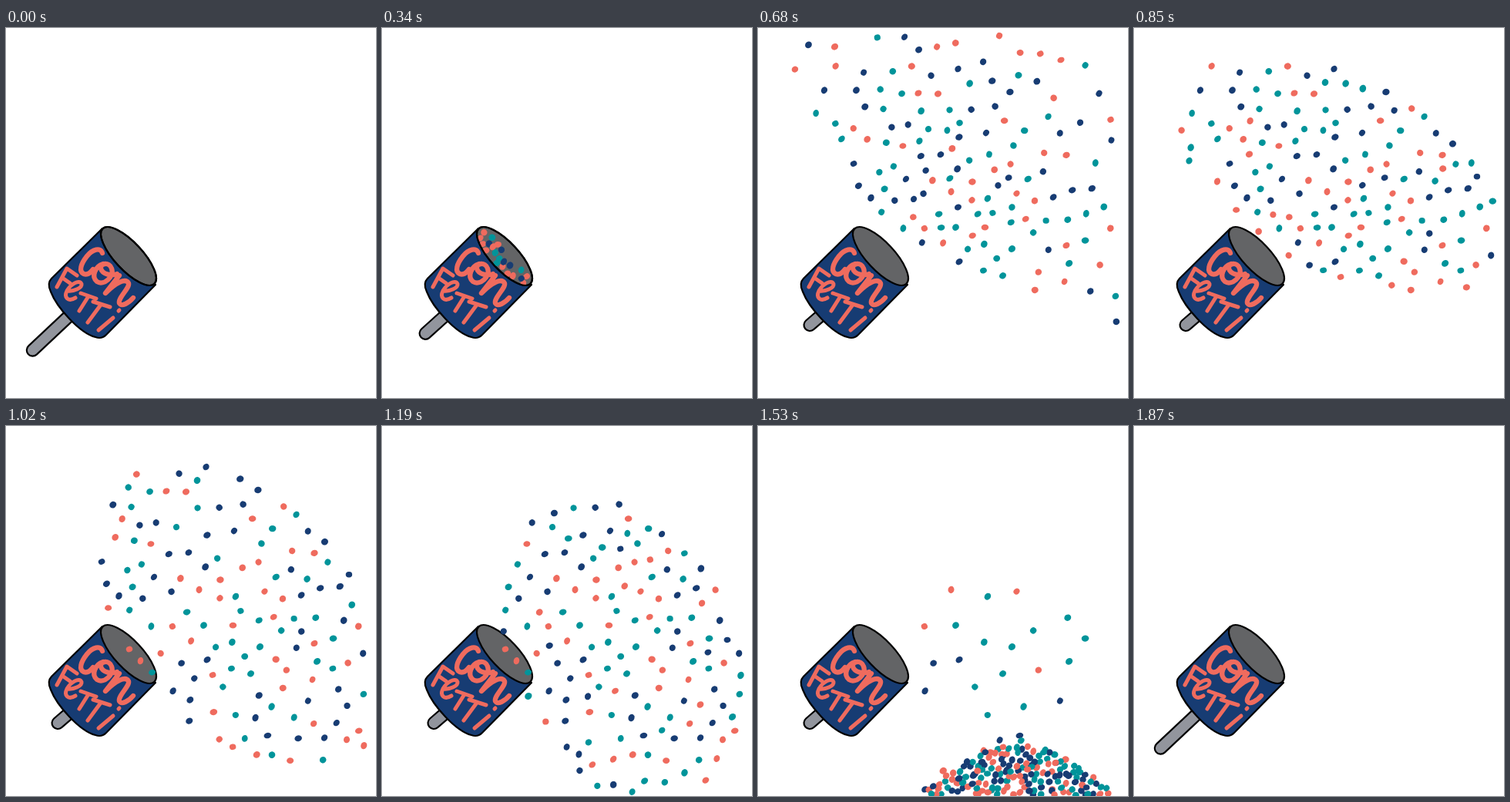
Write an HTML page with a canvas that moves like this. It is 480 px wide and 480 px high and loops after 2.04 s.

```html
<!DOCTYPE html>
<html lang="en">
<head>
<meta charset="utf-8">
<title>Confetti popper</title>
<style>
html, body { margin: 0; height: 100%; overflow: hidden; background: #fff; }
canvas { display: block; width: 100%; height: 100%; }
</style>
</head>
<body>
<canvas id="stage" width="480" height="480" role="img" aria-label="Confetti"></canvas>
<script>
const STEP = 170, STEPS = 12, RAD = Math.PI / 180;
const RED = '#ef6b5e', TEAL = '#00949a', NAVY = '#173c73';
const COLORS = [RED, TEAL, NAVY];
const ctx = document.getElementById('stage').getContext('2d');

function random(seed) {
  return () => {
    seed = seed + 0x6D2B79F5 | 0;
    let t = Math.imul(seed ^ seed >>> 15, 1 | seed);
    t = t + Math.imul(t ^ t >>> 7, 61 | t) ^ t;
    return ((t ^ t >>> 14) >>> 0) / 4294967296;
  };
}
const rnd = random(11);

const dot = (x, y) => ({
  x, y,
  color: COLORS[Math.floor(rnd() * 3)],
  rx: 4.1 + rnd() * .8,
  ry: 3.7 + rnd() * .6,
  turn: -rnd() * 1.4
});

// Regions are tests that tell whether a point lies inside.
function oval(cx, cy, a, b, tilt) {
  const c = Math.cos(tilt * RAD), s = Math.sin(tilt * RAD);
  return (x, y) => {
    const dx = x - cx, dy = y - cy;
    return Math.hypot((dx * c + dy * s) / a, (dy * c - dx * s) / b) < 1;
  };
}

function fan(cx, cy, radius, aim, spread) {
  return (x, y) => {
    const dx = x - cx, dy = y - cy;
    return Math.hypot(dx, dy) < radius &&
      Math.abs(Math.atan2(dy, dx) / RAD - aim) < spread;
  };
}

const heap = (cx, height, width) => (x, y) =>
  Math.abs(x - cx) < width * 1.55 && y > 478 - height * Math.cos((x - cx) / width);

// Fills a region with dots that keep a gap; dots in `keep` get first choice.
function scatter(inside, gap, keep = [], count = 160) {
  const gapAt = typeof gap === 'number' ? () => gap : gap;
  const out = [];
  const fits = (x, y) => inside(x, y) &&
    out.every(d => Math.hypot(d.x - x, d.y - y) >= gapAt(x, y));
  for (const d of keep) if (out.length < count && fits(d.x, d.y)) out.push(d);
  for (let i = 0; i < 12000 && out.length < count; i++) {
    const x = 36 + rnd() * 431, y = 10 + rnd() * 469;
    if (fits(x, y)) out.push(dot(x, y));
  }
  return out;
}

const fromCore = (x, y) => 12 + .06 * Math.hypot(x - 235, y - 220);
const strip = depth => (x, y) =>
  oval(159, 296, 46, 17, 47)(x, y) && (y - 296) * .68 - (x - 159) * .73 > depth;

// Later scenes come first, so that earlier ones can hold the same dots.
const late = scatter(oval(318, 305, 120, 105, 25), 33, [], 21);
const falling = scatter(oval(325, 300, 172, 142, 80), 24, late, 66);
const drift = scatter(heap(330, 78, 80), (x, y) => 6.5 + (480 - y) * .15);
const mound = scatter(heap(338, 64, 80), 6, [], 210);
const edge = scatter(heap(333, 74, 82), 17, [], 24);
const cloud = scatter(oval(305, 248, 232, 146, 50), 19, falling, 135);
const sinking = scatter(oval(312, 295, 210, 146, 65), 18, [...falling, ...cloud], 140);
const burst = scatter(fan(190, 282, 335, -54, 74), fromCore, cloud, 140);
const spread = scatter(oval(265, 190, 235, 125, 30), 17, [...burst, ...cloud], 140);

const scenes = [
  [],
  scatter(strip(3), 6),
  scatter(strip(-5), 6),
  scatter(fan(175, 290, 138, -54, 46), 11),
  burst, spread, cloud, sinking,
  [...falling, ...drift],
  [...late, ...edge, ...mound],
  [...edge, ...mound],
  []
];

const mouth = new Path2D();
mouth.ellipse(159, 296, 49, 18, 47 * RAD, 0, 7);
const body = new Path2D('M125 260L59 325Q53 331 58 342C66 363 96 396 116 401Q124 404 130 398L194 333Z');
const con = new Path2D(
  'M125 292C123 284 112 287 105 296C97 306 94 316 101 319C106 321 110 317 113 313' +
  'M126 306C116 309 110 322 118 329C127 335 141 322 137 312C134 303 122 305 123 312C125 320 138 322 144 319' +
  'M147 321L129 344C143 330 155 324 159 331C161 337 145 350 147 357C150 362 159 357 165 350');
const fetti = new Path2D(
  'M66 336L79 312L92 321M73 324L83 331' +
  'M80 341C88 342 99 337 98 332C95 326 84 332 79 341C75 349 80 356 90 350' +
  'M97 344L117 351M107 348L95 367M113 355L135 362M123 359L106 382' +
  'M139 376L120 392M146 367L147 366');

function stroke(path, width, color) {
  ctx.lineWidth = width;
  ctx.strokeStyle = color;
  ctx.stroke(path);
}

function shape(path, color) {
  ctx.fillStyle = color;
  ctx.fill(path);
  stroke(path, 2.2, '#000');
}

function drawPopper(step) {
  const push = step === STEPS - 1 ? 0 : 10.9 * Math.min(step, 3);
  const handle = new Path2D(`M${34.5 + push} ${418 - push}L92 364`);
  stroke(handle, 17.5, '#000');
  stroke(handle, 13.2, '#92959d');
  shape(body, NAVY);
  shape(mouth, '#636466');
  stroke(con, 6.3, RED);
  stroke(fetti, 5, RED);
}

function drawDots(dots) {
  for (const d of dots) {
    ctx.fillStyle = d.color;
    ctx.beginPath();
    ctx.ellipse(d.x, d.y, d.rx, d.ry, d.turn, 0, 7);
    ctx.fill();
  }
}

function draw(step) {
  ctx.fillStyle = '#fff';
  ctx.fillRect(0, 0, 480, 480);
  ctx.lineCap = ctx.lineJoin = 'round';
  drawPopper(step);
  ctx.save();
  if (step < 3) ctx.clip(mouth);
  drawDots(scenes[step]);
  ctx.restore();
  if (step < 3) stroke(mouth, 2.2, '#000');
}

const start = performance.now();
function tick() {
  draw(Math.floor((performance.now() - start) / STEP) % STEPS);
  requestAnimationFrame(tick);
}
tick();
</script>
</body>
</html>
```
